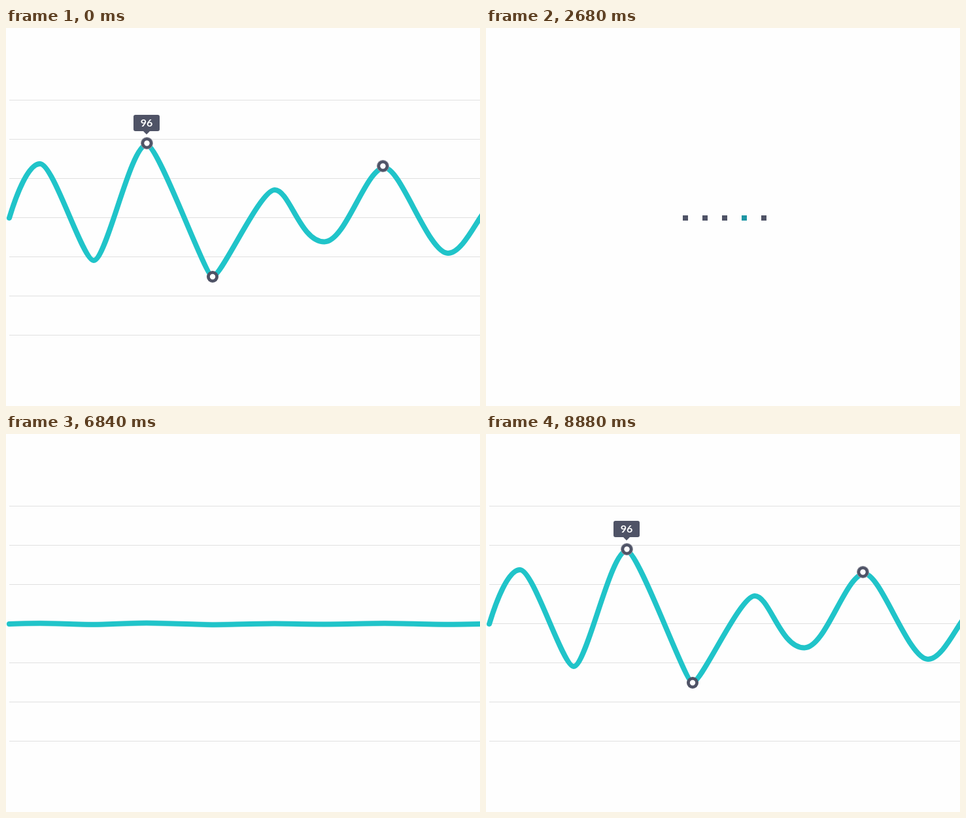
Write an HTML page with a canvas that moves like this. It is 725 by 579 pixels and loops after 9080 ms.

```html
<!DOCTYPE html>
<html lang="en">
<head>
<meta charset="utf-8">
<title>Chart loader</title>
<style>
  html, body { margin: 0; width: 100%; height: 100%; overflow: hidden; background: #fefefe; }
  canvas { display: block; }
</style>
</head>
<body>
<canvas id="stage" width="725" height="579"></canvas>
<script>
const W = 725, H = 579, LOOP = 9080, MID = 365, BASE = 291;
const BG = '#fefefe', TEAL = [32, 196, 201], BRIGHT = [5, 194, 203], SLATE = [79, 83, 102];
const SHUTTER = 20, SAMPLES = 8;

const out = document.getElementById('stage').getContext('2d');
const layer = document.createElement('canvas');
layer.width = W;
layer.height = H;
const g = layer.getContext('2d');

const clamp = v => Math.max(0, Math.min(1, v));
const span = (t, start, length) => clamp((t - start) / length);
const smooth = k => k * k * (3 - 2 * k);
const cubic = k => k < .5 ? 4 * k ** 3 : 1 - 4 * (1 - k) ** 3;
const backOut = (k, s) => 1 + (k - 1) ** 2 * ((s + 1) * (k - 1) + s);
const rgb = c => `rgb(${c})`;
const mix = (a, b, k) => a.map((v, i) => Math.round(v + (b[i] - v) * k));

// Bezier segments of the wave: two handles, then the end point.
const WAVE = [
  [16, 255, 34, 208, 52, 208],
  [73, 208, 117, 356, 134, 356],
  [154, 356, 190, 179, 215, 179],
  [234, 179, 304, 380.5, 316, 380.5],
  [330, 380.5, 388, 248, 411, 248],
  [434, 248, 450, 327.5, 487, 327.5],
  [520, 327.5, 550, 214, 579, 214],
  [604, 214, 646, 345, 676, 345],
  [694, 345, 712, 311, 725, 291]
];
const MARKERS = [
  { x: 215.5, y: 176.5, start: 7400, rim: true },
  { x: 316, y: 381, start: 7580 },
  { x: 576.5, y: 211.5, start: 7760, rim: true }
];

function disc(x, y, r, color) {
  g.fillStyle = color;
  g.beginPath();
  g.arc(x, y, r, 0, 7);
  g.fill();
}

function drawChart(amp, half) {
  g.save();
  g.beginPath();
  g.rect(MID - half, 0, half * 2, H);
  g.clip();
  g.fillStyle = '#e0e0e0';
  for (let y = 110; y <= 470; y += 60) g.fillRect(5, y, W, 1);
  const level = y => BASE + (y - BASE) * amp;
  g.strokeStyle = rgb(half < MID ? BRIGHT : TEAL);
  g.lineWidth = 8;
  g.lineCap = g.lineJoin = 'round';
  g.beginPath();
  g.moveTo(5, BASE);
  for (const [a, b, c, d, e, f] of WAVE) g.bezierCurveTo(a, level(b), c, level(d), e, level(f));
  g.lineTo(W + 10, BASE - 15 * amp);
  g.stroke();
  g.restore();
}

function drawDots(t, spread) {
  const chase = t - 2208;
  const running = chase >= 0 && t < 5408;
  for (let i = 0; i < 5; i++) {
    const phase = (chase % 640) / 128 - i;
    const glow = running ? clamp(1 - Math.abs(phase * 2 - 1)) : 0;
    g.fillStyle = rgb(mix(SLATE, BRIGHT, Math.max(glow, 1 - spread)));
    g.fillRect(MID - 4 + (i - 2) * 30 * spread, BASE - 4, 8, 8);
  }
}

function drawMarker({ x, y, start, rim }, t) {
  const scale = t < 1000
    ? 1 - smooth(span(t, 705, 165))
    : backOut(span(t, start, 320), 2.6);
  if (scale < .01) return;
  if (rim) disc(x, y, 9.5 * scale, rgb(mix(SLATE, [254, 254, 254], .4)));
  disc(x, y, (rim ? 8.6 : 9) * scale, rgb(SLATE));
  disc(x, y, 4.2 * scale, '#fff');
}

function drawTip(t) {
  let shift, alpha, stretch = 1;
  if (t < 1000) {
    const k = span(t, 705, 165);
    shift = -120 * k * k;
    alpha = 1 - k;
  } else {
    const k = span(t, 8340, 520), pose = backOut(k, 1.7);
    shift = 50 * (pose - 1);
    alpha = clamp(k * 4);
    stretch = Math.max(1, pose);
  }
  if (!alpha) return;
  g.save();
  g.globalAlpha = alpha;
  g.translate(215, shift);
  g.scale(stretch, 1);
  g.fillStyle = rgb(SLATE);
  g.beginPath();
  g.roundRect(-20, 133, 40, 25, 3);
  g.moveTo(-5, 158);
  g.lineTo(5, 158);
  g.lineTo(0, 163);
  g.fill();
  g.fillStyle = '#fff';
  g.font = 'bold 16px Lato, sans-serif';
  g.textAlign = 'center';
  g.fillText('96', 0, 151);
  g.restore();
}

function drawScene(t) {
  t = (t + LOOP) % LOOP;
  g.fillStyle = BG;
  g.fillRect(0, 0, W, H);
  const leaving = t < 4000;
  const amp = leaving ? 1 - cubic(span(t, 1055, 590)) : smooth(span(t, 6800, 600));
  const open = leaving ? 1 - smooth(span(t, 1640, 434)) : smooth(span(t, 6200, 560));
  const spread = leaving ? smooth(span(t, 2040, 170)) : 1 - smooth(span(t, 5940, 270));
  if (open > 0) drawChart(amp, MID * open);
  if (spread > 0) drawDots(t, spread);
  if (t < 1000 || t > 7300) {
    MARKERS.forEach(m => drawMarker(m, t));
    drawTip(t);
  }
}

// Averages several moments around t for motion blur.
function render(t) {
  for (let i = 0; i < SAMPLES; i++) {
    drawScene(t + ((i + .5) / SAMPLES - .5) * SHUTTER);
    out.globalAlpha = 1 / (i + 1);
    out.drawImage(layer, 0, 0);
  }
}

const began = performance.now();
function tick() {
  const t = (performance.now() - began) % LOOP;
  render(Math.floor(t / 40) * 40);
  requestAnimationFrame(tick);
}
tick();
</script>
</body>
</html>
```
